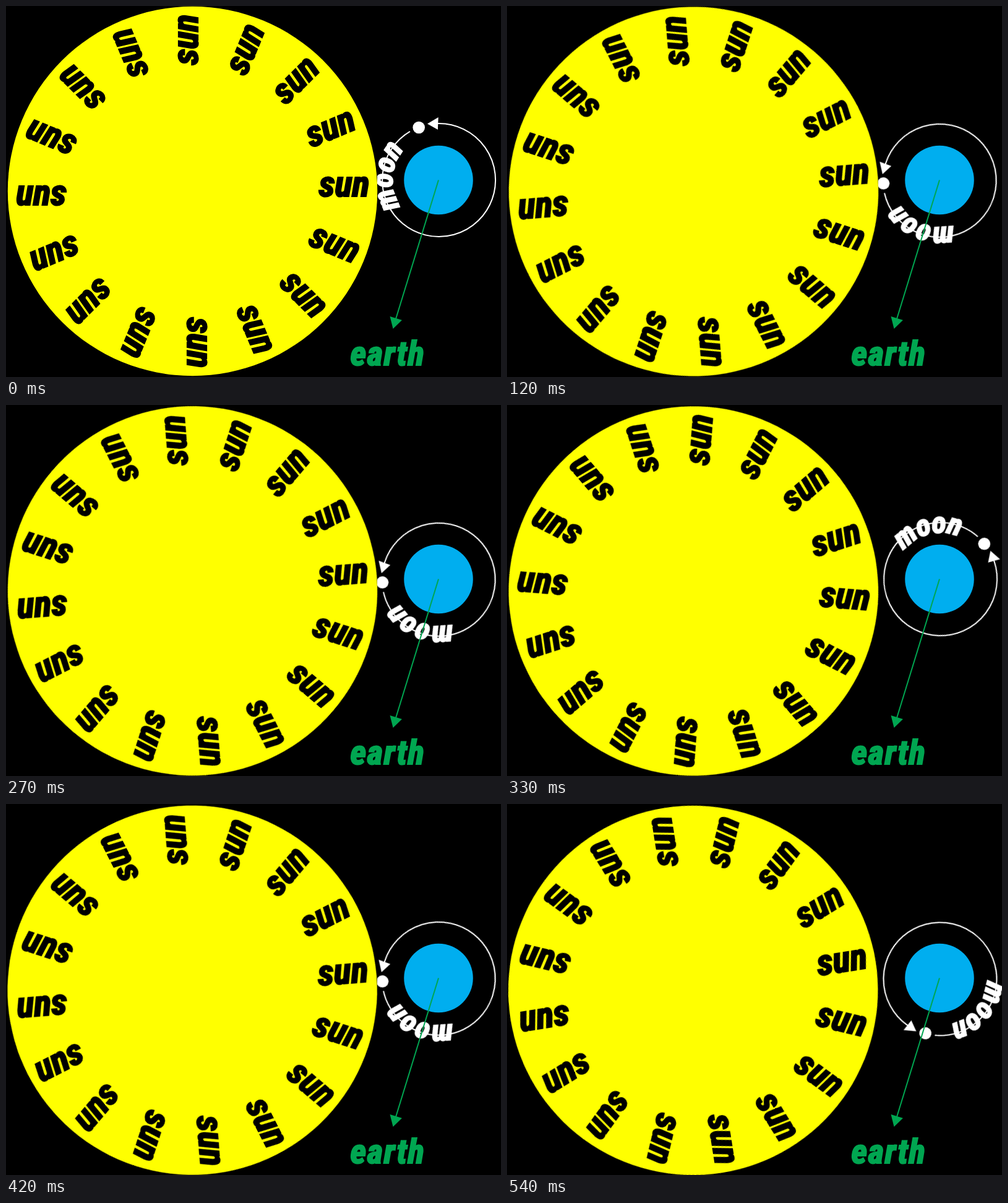
Recreate the animation shown at these times as an HTML page. Size 800 by 600 pixels, loop 0.57 s.

```html
<!DOCTYPE html>
<html lang="en">
<head>
<meta charset="utf-8">
<title>Sun, earth and moon</title>
<style>
  html, body { margin: 0; width: 100%; height: 100%; overflow: hidden; background: #000; }
  svg { display: block; width: 800px; height: 600px; }
  text {
    font-family: "Roboto Condensed", Roboto, "Liberation Sans", sans-serif;
    font-weight: 900;
    font-style: italic;
    font-stretch: 75%;
    text-anchor: middle;
    stroke-width: 2.2px;
  }
  .spin { animation: spin 570ms steps(19) infinite; }
  #sun { --turn: 85.5deg; transform-origin: 300px 300px; }
  #moon { --turn: 1368deg; transform-origin: 700px 282.2px; }
  #sun text { font-size: 58.5px; stroke: #000; }
  #moon text { font-size: 47.5px; letter-spacing: -1px; stroke: #fff; }
  #earth text { font-size: 55px; letter-spacing: 1.7px; stroke: #00a651; }
  @keyframes spin { to { transform: rotate(var(--turn)); } }
</style>
</head>
<body>
<svg viewBox="0 0 800 600">
  <defs>
    <clipPath id="side"><rect x="600" width="200" height="600"/></clipPath>
    <path id="curve" d="M0 75A75 75 0 0 1 0 -75A75 75 0 0 1 75 0"/>
  </defs>

  <g id="sun" class="spin">
    <circle cx="301.5" cy="299.5" r="298.7" fill="#ff0"/>
    <g id="rays" transform="translate(301.5 299.5)"></g>
  </g>

  <g clip-path="url(#side)">
    <g id="moon" class="spin" fill="#fff">
      <g transform="translate(699.5 281.5)">
        <path d="M-2 -91.5H0A91.5 91.5 0 1 1 -46.6 -78.7" fill="none" stroke="#fff" stroke-width="2"/>
        <path d="M-18.5 -91L-.8 -101.5L-1.6 -81.5Z"/>
        <circle cx="-32.3" cy="-85" r="9.8"/>
        <text><textPath href="#curve" startOffset="122">moon</textPath></text>
      </g>
    </g>
  </g>

  <g id="earth" fill="#00a651">
    <circle cx="699" cy="281.5" r="55.8" fill="#00aeef"/>
    <path d="M699 281.5L630 506" stroke="#00a651" stroke-width="2"/>
    <path d="M620.5 502L640 508L625.5 522Z"/>
    <text x="617" y="581.3">earth</text>
  </g>
</svg>
<script>
  const rays = document.getElementById("rays");
  for (let i = 0; i < 16; i++) {
    const word = document.createElementNS(rays.namespaceURI, "text");
    word.textContent = "sun";
    word.setAttribute("transform", `rotate(${i * 22.5}) translate(245 8.7)`);
    rays.append(word);
  }
</script>
</body>
</html>
```
